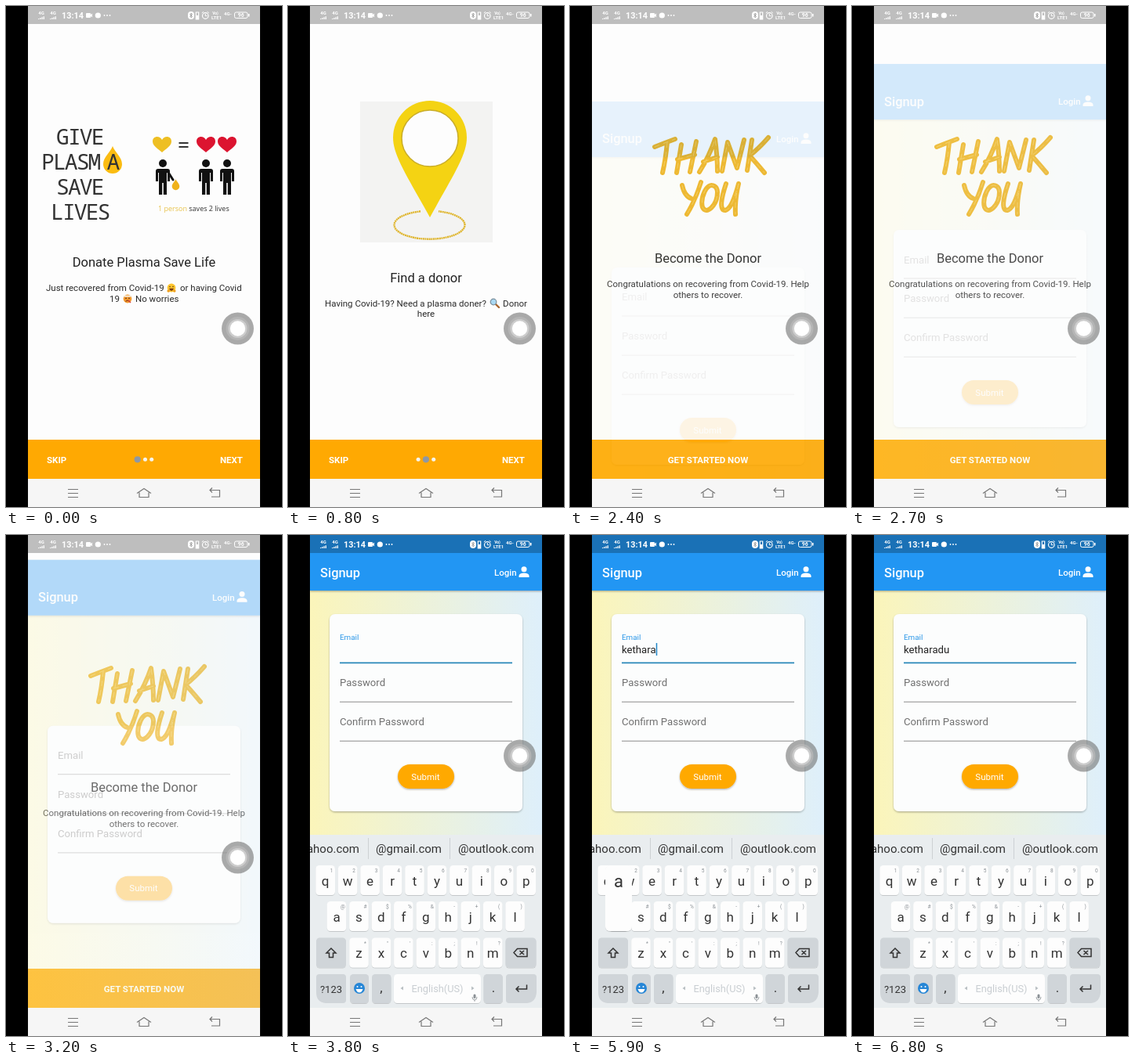
Recreate the animation shown at these times as an HTML page. Size 352 px wide and 640 px high, loop 7 s.

```html
<!DOCTYPE html>
<html lang="en">
<head>
<meta charset="utf-8">
<title>Plasma donor app</title>
<style>
html, body { margin: 0; width: 100%; height: 100%; overflow: hidden; background: #000; }
svg { display: block; width: 100vw; height: 100vh; font-family: Roboto, sans-serif; }
text { white-space: pre; }
</style>
</head>
<body>
<svg id="stage" viewBox="0 0 352 640"></svg>
<script>
const LOOP = 7000, W = 296;
const stage = document.getElementById('stage');

// Markup helpers
const text = (s, x, y, size, fill, more = '') =>
  `<text x="${x}" y="${y}" font-size="${size}" fill="${fill}" ${more}>${s}</text>`;
const mid = (s, x, y, size, fill, more = '') => text(s, x, y, size, fill, 'text-anchor="middle" ' + more);
const rect = (x, y, w, h, fill, more = '') =>
  `<rect x="${x}" y="${y}" width="${w}" height="${h}" fill="${fill}" ${more}/>`;
const circle = (x, y, r, fill, more = '') => `<circle cx="${x}" cy="${y}" r="${r}" fill="${fill}" ${more}/>`;
const line = (d, stroke, w = 1, more = '') =>
  `<path d="${d}" fill="none" stroke="${stroke}" stroke-width="${w}" ${more}/>`;
const shape = (d, fill, more = '') => `<path d="${d}" fill="${fill}" ${more}/>`;
const group = (id, body, more = '') => `<g id="${id}" ${more}>${body}</g>`;
const at = (x, y, body, s = 1) => `<g transform="translate(${x} ${y}) scale(${s})">${body}</g>`;

const INK = '#2b2b2b', GOLD = '#ffa902';
const heading = (s, y) => mid(s, 176, y, 16.5, '#222');
const note = (s, x, y) => text(s, x, y, 11.5, INK);
const noteMid = (s, y) => mid(s, 176, y, 11.5, INK);

// Page 1
const heart = (x, fill) => at(x, 177,
  shape('M0 10C-4 6-12 2-12-4C-12-11-3-12 0-6C3-12 12-11 12-4C12 2 4 6 0 10Z', fill));
const drop = 'M0-17C3-9 12-3 12 6A12 12 0 0 1-12 6C-12-3-3-9 0-17Z';
const person = (x, arm) => at(x, 201,
  circle(0, 0, 5, '#111') +
  shape('M-6 7H6Q9 7 9 10V23H6V12H5V40H.8V25H-.8V40H-5V12H-6V23H-9V10Q-9 7-6 7Z', '#111') +
  (arm ? line('M6 10L13 21', '#111', 3, 'stroke-linecap="round"') : ''));
const word = (s, x, y) => text(s, x, y, 28, '#333',
  'font-weight="300" letter-spacing="-1.9" font-family="Noto Sans Mono, monospace"');
const hugFace = circle(0, 0, 5.4, '#fdc52f') + circle(-2, -1.5, .8, '#5b3a10') + circle(2, -1.5, .8, '#5b3a10') +
  shape('M-3 .8H3Q2 4 0 4T-3 .8Z', '#7a3b12') + circle(-3.8, 4, 1.8, '#f0a020') + circle(3.8, 4, 1.8, '#f0a020');
const sickFace = circle(0, 0, 5.4, '#f39a2e') + rect(-4.5, -4.2, 9, 1.8, '#f3eee4') +
  circle(-2, -.6, .8, '#5b2a10') + circle(2, -.6, .8, '#5b2a10') +
  line('M-2.5 3.3Q0 .8 2.5 3.3', '#7a2a12', 1) + line('M1 2L4 5', '#d8433c', 1.4);

const page1 = word('GIVE', 64, 177) +
  at(136, 196, shape(drop, '#fbbc12')) +
  word('PLASM', 45, 209) + word('A', 128.5, 209) + word('SAVE', 64, 241) + word('LIVES', 57, 273) +
  heart(199, '#eebf23') + heart(255, '#dc1430') + heart(282, '#dc1430') +
  line('M220.500 175H232.500M220.500 180H232.500', '#333', 2) +
  person(200, true) + person(255) + person(282) +
  at(216.500, 228, shape(drop, '#f0b21c'), .4) +
  `<text x="194" y="261.500" font-size="9" font-family="Open Sans, sans-serif" fill="#333"><tspan fill="#e8c24a">1 person</tspan> saves 2 lives</text>` +
  heading('Donate Plasma Save Life', 333) +
  note('Just recovered from Covid-19', 51, 364) + at(211, 360, hugFace) + note('or having Covid', 222, 364) +
  note('19', 132, 378) + at(155, 374, sickFace) + note('No worries', 165, 378);

// Page 2
const page2 = rect(92, 122, 169, 180, '#f3f3f2') +
  line('M169 262.300A45 18 0 1 0 192 262.300', '#dfb52c', 2.4, 'stroke-dasharray="2 .6"') +
  shape('M181 121A47 47 0 0 1 228 168C228 190 212 214 181 270C150 214 134 190 134 168A47 47 0 0 1 181 121Z', '#f4d313') +
  circle(181, 169, 36, '#fdfdfd', 'stroke="#c9ad2a" stroke-width="1.500"') +
  heading('Find a donor', 353) +
  note('Having Covid-19? Need a plasma doner?', 47, 384) +
  at(263, 379, line('M2 2L6 6', '#a8662e', 2.4, 'stroke-linecap="round"') +
    circle(-1, -1, 3.8, '#a9d8f2', 'stroke="#7b8f9c" stroke-width="1.200"')) +
  text('Donor', 305, 384, 11.5, INK, 'text-anchor="end"') + noteMid('here', 397);

// Page 3
const brush = [
  'M108 180Q118 176 134 170M124 174Q122 196 118 213',
  'M142 177L136 213M161 173L153 212M137 196L159 190',
  'M165 212Q178 191 185 170Q188 192 188 211M170 199L188 193',
  'M194 211L201 174L213 207L222 171',
  'M232 171L226 210M253 168Q240 183 229 191Q238 201 248 213',
  'M143 229Q146 243 155 246M167 225Q160 248 149 266',
  'M184 230C174 224 166 246 169 257C174 268 188 254 188 238Q188 232 184 230',
  'M199 227C193 245 190 261 198 261C206 259 211 242 215 227M215 227Q210 248 211 266'
].join('');
const page3 = line(brush, '#eeb322', 6, 'stroke-linecap="round" stroke-linejoin="round"') +
  line(brush, '#f6cb55', 1, 'stroke-dasharray="7 5"') +
  heading('Become the Donor', 328) +
  noteMid('Congratulations on recovering from Covid-19. Help', 359) + noteMid('others to recover.', 373);

// Sign-up screen, drawn in its keyboard-open position
const footText = (s, x, anchor) => text(s, x, 583.5, 11.5, '#fff', `font-weight="600" text-anchor="${anchor}"`);
const signup = rect(28, 0, W, 640, 'url(#sky)') +
  group('form',
    rect(53, 101, 246, 252, '#fcfdfd', 'rx="7" filter="url(#soft)"') +
    text('Email', 66, 0, 13.15, '#757575', 'id="label"') +
    text('', 66, 150.5, 13.15, '#222', 'id="typed"') +
    rect(0, 138, 1.5, 16, '#2186c8', 'id="caret"') +
    rect(66, 162.5, 220, 1, '#888', 'id="rule"') +
    text('Password', 66, 193, 13.15, '#707070') + rect(66, 212.7, 220, 1, '#8c8c8c') +
    text('Confirm Password', 66, 243, 13.15, '#707070') + rect(66, 262.7, 220, 1, '#8c8c8c') +
    rect(140, 293, 72, 31, GOLD, 'rx="15.500" filter="url(#soft)"') + mid('Submit', 175.5, 312.7, 11.5, '#fff')) +
  rect(28, 0, W, 71, '#2196f3', 'filter="url(#soft)"') +
  text('Signup', 41, 53.5, 16.44, '#fff', 'font-weight="500"') + text('Login', 263, 52, 11.5, '#fff', 'font-weight="500"') +
  circle(301, 43.7, 3.5, '#fff') + shape('M294.500 54V52Q295 48.500 301 48.500T307.500 52V54Z', '#fff');

// Keyboard
const keyAt = {};
const key = (x, y, w, h, fill = '#fdfdfd') => rect(x, y, w, h, fill, 'rx="4.500" filter="url(#thin)"');
const keyRow = (letters, hints, x0, y) => [...letters].map((c, i) => {
  const x = x0 + 28.45 * i;
  keyAt[c] = [x, y];
  return key(x - 12.3, y, 24.6, 38) + mid(c, x, y + 25.5, 17, '#333') + mid(hints[i], x + 8, y + 9, 6.5, '#8b9196');
}).join('');
const DIM = '#d0d5d9';
const keyboard = rect(28, 383, W, 240, '#e9edef') +
  text('@yahoo.com', 91, 406, 15, '#333', 'text-anchor="end"') + mid('@gmail.com', 154, 406, 15, '#333') +
  text('@outlook.com', 314, 406, 15, '#333', 'text-anchor="end"') +
  rect(102, 387, 1, 27, '#cdd1d4') + rect(206, 387, 1, 27, '#cdd1d4') +
  keyRow('qwertyuiop', '1234567890', 47.7, 422) +
  keyRow('asdfghjkl', '@#$%&-+()', 62, 468) +
  keyRow('zxcvbnm', '*"\':;!?', 90.5, 514.5) +
  key(36, 514.5, 38, 38, DIM) + key(277.5, 514.5, 39, 38, DIM) +
  line('M55 528L49 534H52.500V539.500H57.500V534H61Z', '#333', 1.5) +
  line('M288 533.500L292.500 528.500H305V538.500H292.500ZM295.500 531L301 536M301 531L295.500 536', '#333', 1.5) +
  shape('M40 561H70Q74 561 74 565V594Q74 598 70 598H48Q36 597 36 584V565Q36 561 40 561Z', DIM) +
  mid('?123', 55, 584.5, 13, '#333') +
  key(79, 561, 24, 37, DIM) + circle(91, 579, 7, '#2686d6') + circle(88.5, 577, 1, '#fff') + circle(93.5, 577, 1, '#fff') +
  shape('M86.500 580H95.500Q94 584.500 91 584.500T86.500 580Z', '#fff') +
  key(107, 561, 24.5, 37, DIM) + mid(',', 119, 584, 17, '#333') +
  key(135, 561, 111, 37) + mid('English(US)', 190.5, 584, 12.8, '#c9ced2') +
  shape('M147 576.500V581.500L143.500 579ZM234 576.500V581.500L237.500 579Z', '#b9bfc3') +
  rect(236.5, 586.5, 3, 5.5, '#8b9196', 'rx="1.500"') + line('M235 590Q235 594 238 594T241 590M238 594V596', '#8b9196', .8) +
  key(249.5, 561, 24.5, 37, DIM) + mid('.', 262, 584, 17, '#333') +
  shape('M282 561H313Q317 561 317 565V584Q316 597 305 598H282Q278 598 278 594V565Q278 561 282 561Z', DIM) +
  line('M304.500 574.500V580H291M294.500 576.500L291 580L294.500 583.500', '#333', 1.5);

// System bars
const signal = x => mid('4G', x, 11, 6, '#fff', 'font-weight="700"') +
  [0, 1, 2, 3].map(i => rect(x - 4 + i * 2.2, 16 - i * .9, 1.3, 1 + i * .9, '#fff')).join('');
const status = rect(28, 0, W, 23, '#000', 'opacity=".25"') + signal(45) + signal(60) +
  text('13:14', 71, 16, 10.8, '#fff', 'font-weight="600"') +
  rect(102, 9, 6, 6, '#fff', 'rx="1"') + shape('M107 12L110 9.500V14.500Z', '#fff') +
  circle(117.3, 12, 3.6, '#fff') + [125.5, 129, 132.5].map(x => circle(x, 12, .9, '#fff')).join('') +
  rect(232, 7, 8, 10, '#fff', 'rx="4"') + line('M234.500 10L237.500 13.500L236 15V9L237.500 10.500L234.500 14', '#888', .7) +
  line('M242.300 8H245.700V17H242.300Z', '#fff', 1.2) + rect(242.5, 12, 3, 5, '#fff') +
  circle(254.3, 12.5, 3.8, 'none', 'stroke="#fff" stroke-width="1.200"') +
  line('M254.300 10V12.700H256.500M249.800 9L252 7.200M258.800 9L256.600 7.200', '#fff') +
  mid('Vo)', 267, 11, 5, '#fff', 'font-weight="700"') + mid('LTE1', 268.5, 17, 6, '#fff', 'font-weight="700"') +
  mid('4G-', 283, 12, 6, '#fff', 'font-weight="700"') +
  rect(291.5, 8, 16.5, 7.5, 'none', 'rx="2" stroke="#fff" stroke-width="1"') + rect(309, 10, 1.5, 3.5, '#fff') +
  mid('96', 299.7, 14.2, 6.8, '#fff', 'font-weight="700"');
const nav = rect(28, 604, W, 36, '#f6f6f6') +
  line('M79 617.500H92M79 622.500H92M79 627.500H92', '#777', 1.2) +
  line('M167 622.500L176 616.500L185 622.500M170 621.500V627.500H182V621.500', '#777', 1.2) +
  line('M263 615.500L260 618.500L263 621.500M260 618.500H272.500V627H262', '#777', 1.2);

stage.innerHTML = `<defs>
  <linearGradient id="sky"><stop offset="0" stop-color="#fbf5ba"/><stop offset="1" stop-color="#deeffb"/></linearGradient>
  <filter id="soft" x="-10%" y="-20%" width="120%" height="150%"><feDropShadow dx="0" dy="1.200" stdDeviation="1.300" flood-opacity=".3"/></filter>
  <filter id="thin" x="-10%" y="-10%" width="120%" height="125%"><feDropShadow dx="0" dy=".8" stdDeviation=".4" flood-opacity=".2"/></filter>
  <clipPath id="screen"><rect x="28" width="${W}" height="640"/></clipPath></defs>` +
  rect(0, 0, 352, 640, '#000') +
  group('phone',
    rect(28, 0, W, 640, '#fdfdfd') +
    group('pages', [page1, page2, page3].map((p, i) => at(i * W, 0, p)).join('')) +
    rect(28, 554, W, 50, GOLD) +
    group('steps', footText('SKIP', 52, 'start') + footText('NEXT', 302, 'end') +
      [0, 1, 2].map(i => circle(0, 579.3, 3, '#fff', `id="dot${i}"`)).join('')) +
    group('start', footText('GET STARTED NOW', 176, 'middle')) +
    group('signup', signup) + group('keyboard', keyboard) +
    group('popup', rect(-17, -46, 34, 84, '#fdfdfd', 'rx="6" filter="url(#thin)"') + mid('', 0, -18, 22, '#333', 'id="popText"')) +
    nav + status +
    group('bubble', circle(0, 0, 20.5, '#777', 'opacity=".62"') + circle(0, 0, 15, '#bbb', 'opacity=".65"') +
      circle(0, 0, 12, '#ddd', 'opacity=".6"') + circle(0, 0, 9.7, '#fff')),
    'clip-path="url(#screen)"');

// Motion
const el = id => document.getElementById(id);
const set = (id, attrs) => { for (const k in attrs) el(id).setAttribute(k, attrs[k]); };
const show = (id, on) => set(id, { visibility: on ? 'visible' : 'hidden' });
const mix = (a, b, p) => a + (b - a) * p;
const ramp = (t, from, to) => Math.min(1, Math.max(0, (t - from) / (to - from)));
const smooth = p => p * p * (3 - 2 * p);
const track = (t, pts) => pts.slice(1).reduce((v, [x, y], i) =>
  t >= pts[i][0] ? mix(pts[i][1], y, ramp(t, pts[i][0], x)) : v, pts[0][1]);
function bezier(x1, y1, x2, y2, x) {
  const f = (a, b, s) => 3 * a * s * (1 - s) ** 2 + 3 * b * s * s * (1 - s) + s ** 3;
  let lo = 0, hi = 1;
  for (let i = 0; i < 24; i++) {
    const m = (lo + hi) / 2;
    if (f(x1, x2, m) < x) lo = m; else hi = m;
  }
  return f(y1, y2, (lo + hi) / 2);
}

const NAME = 'ketharadu';
const PRESS = [4300, 4800, 4900, 5000, 5500, 5700, 5900, 6200, 6400];

function draw(t) {
  // Intro pages
  const scroll = ramp(t, 50, 550) + ramp(t, 950, 1450);
  set('pages', { transform: `translate(${-scroll * W} 0)` });
  show('steps', scroll < 1.5);
  show('start', scroll >= 1.5);
  const second = ramp(t, 300, 450);
  let x = 162;
  [1 - second, second, 0].forEach((on, i) => {
    const w = mix(5, 8.2, on);
    set('dot' + i, { cx: x + 1.6 + w / 2, r: w / 2, fill: `rgb(${mix(245, 142, on)},${mix(245, 152, on)},${mix(240, 165, on)})` });
    x += w + 3.2;
  });

  // Sign-up rises and fades in
  const p = track(t, [[2400, .25], [3000, .48], [3100, .48], [3200, .52], [3450, 1]]);
  show('signup', t >= 2400);
  set('signup', {
    transform: `translate(0 ${160 * (1 - bezier(.4, 0, .2, 1, p))})`,
    opacity: bezier(.42, 0, 1, 1, p)
  });

  // Keyboard and focus
  const up = smooth(ramp(t, 3480, 3790)), focus = smooth(ramp(t, 3480, 3680)), focused = t >= 3480;
  show('keyboard', focused);
  set('keyboard', { transform: `translate(0 ${221 * (1 - up)})` });
  set('form', { transform: `translate(0 ${111 * (1 - up)})` });
  set('bubble', { transform: `translate(295.500 ${mix(412, 282, up)})` });
  set('label', { y: mix(143.5, 133.7, focus), 'font-size': mix(13.15, 9.87, focus), fill: focused ? '#2b97e8' : '#757575' });
  set('rule', { height: focused ? 1.7 : 1, fill: focused ? '#2686b8' : '#888' });

  // Typing
  const count = PRESS.filter(at => t >= at).length;
  el('typed').textContent = NAME.slice(0, count);
  set('caret', { x: 66.2 + (count ? el('typed').getComputedTextLength() : 0) });
  const caretOn = t >= 3900 && t < 6800;
  el('caret').style.display = caretOn ? '' : 'none';
  const popped = count > 1 && count < 8 && t - PRESS[count - 1] < 95;
  show('popup', popped);
  if (popped) {
    const c = NAME[count - 1];
    el('popText').textContent = c;
    set('popup', { transform: `translate(${keyAt[c].join(' ')})` });
  }
}

const begin = performance.now();
function tick() {
  draw((performance.now() - begin) % LOOP);
  requestAnimationFrame(tick);
}
tick();
</script>
</body>
</html>
```
